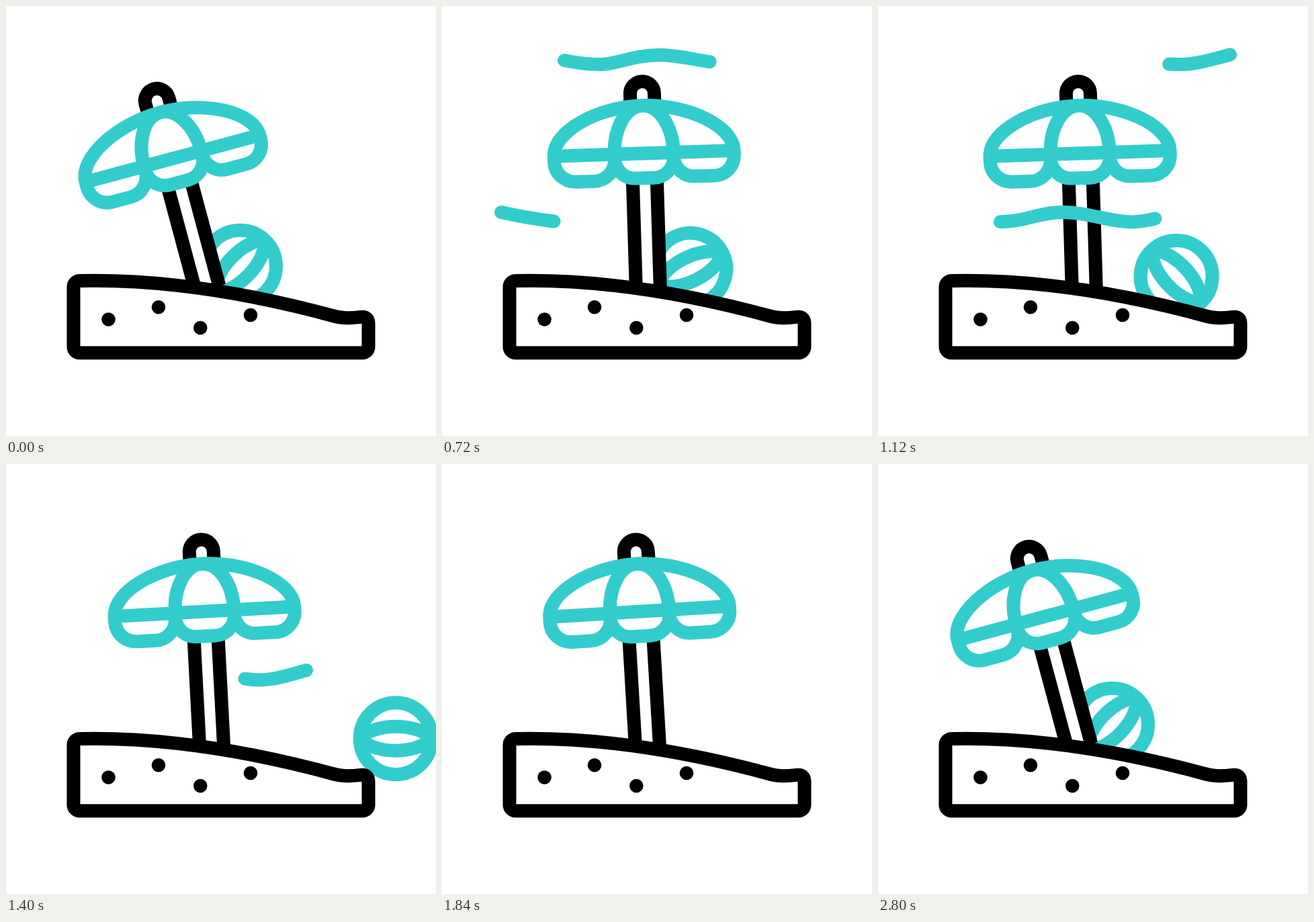
These frames come from a looping animation (640x640 px, 3 s). An HTML page:

```html
<!DOCTYPE html>
<html lang="en">
<head>
<meta charset="utf-8">
<title>Windy beach</title>
<style>
  html, body { margin: 0; height: 100%; overflow: hidden; background: #fff; }
  svg { display: block; width: 100%; height: 100%; }
  .line { fill: none; stroke-width: 20; stroke-linejoin: round; }
  .teal { stroke: #33cccc; }
  .black { stroke: #000; }
  .filled { fill: #fff; }
  .wind { stroke-linecap: round; }
</style>
</head>
<body>
<svg viewBox="0 0 640 640">
  <g id="ball" class="line teal">
    <circle r="53.5" class="filled"/>
    <path d="M-53 0C-32 -24 32 -24 53 0M-53 0C-32 24 32 24 53 0"/>
  </g>

  <!-- Origin is the foot of the pole -->
  <g id="umbrella" class="line">
    <!-- Hides the ball on the left of the pole -->
    <path fill="#fff" d="M-200 -190H18V0H-200Z"/>
    <path class="black filled" d="M-18 -30V-320A18 18 0 0 1 18 -320V-30"/>
    <g class="teal">
      <path class="filled" d="M-134 -231C-134 -267 -68 -302 0 -302S134 -267 134 -231V-224.5A30 30 0 0 1 104 -194.5H74
        A30 30 0 0 1 44 -224A30 30 0 0 1 14 -194H-14A30 30 0 0 1 -44 -223A31 31 0 0 1 -75 -191.5H-103
        A31 31 0 0 1 -134 -222.5Z"/>
      <path d="M-134 -230.5L134 -231M-44 -222V-231A44 71 0 0 1 44 -231V-222"/>
    </g>
  </g>

  <path class="line black filled" d="M100.5 507V418A9 9 0 0 1 109.5 409C240 406 370 429.3 490 462
    C498 464.3 508 465.2 528 462.9Q539.5 462 539.5 472V507A9 9 0 0 1 530.5 516.3H109.5A9 9 0 0 1 100.5 507Z"/>
  <g>
    <circle cx="152.5" cy="466.5" r="10.3"/>
    <circle cx="227" cy="448.3" r="10.3"/>
    <circle cx="289.3" cy="479" r="10.3"/>
    <circle cx="364" cy="460" r="10.3"/>
  </g>

  <path id="highWind" class="line teal wind" pathLength="1"
    d="M168 78C195 84 215 87 237 87S285 73 323 73C365 73 385 86 450 87C472 87 500 79 524 72.5"/>
  <path id="lowWind" class="line teal wind" pathLength="1"
    d="M88 307C120 314 146 318 166 320.5C215 325 235 307 275 307S340 321 378 321.5C402 321 425 313 447 307"/>
</svg>
<script>
const LOOP = 3000;
const [ball, umbrella, highWind, lowWind] =
  ["ball", "umbrella", "highWind", "lowWind"].map(id => document.getElementById(id));

const linear = u => u;
const smooth = u => u * u * (3 - 2 * u);

// Value at time t on a track of [time, value] keys
function track(keys, t, ease) {
  if (t <= keys[0][0]) return keys[0][1];
  for (let i = 1; i < keys.length; i++) {
    const [t0, a] = keys[i - 1], [t1, b] = keys[i];
    if (t < t1) return a + (b - a) * ease((t - t0) / (t1 - t0));
  }
  return keys[keys.length - 1][1];
}

const tilt = [[240, -15], [700, -1.75], [1300, -1.75], [1500, -4.25], [1740, -1.75], [2200, -15]];
const windHead = [[560, 0], [720, .217], [1000, .646], [1120, .9], [1200, 1]];
const windTail = [[980, 0], [1120, .259], [1400, .743], [1650, 1]];

function drawWind(path, t) {
  const head = track(windHead, t, linear), tail = track(windTail, t, linear);
  path.style.display = head > tail ? "" : "none";
  path.setAttribute("stroke-dasharray", `${head - tail} 3`);
  path.setAttribute("stroke-dashoffset", -tail);
}

// Distance rolled from rest: blown off to the right, then back from behind the pole
function rolled(t) {
  if (t < 1900) {
    const s = Math.max(0, t - 240) / 1160;
    return 115 * s ** 2 + 116 * s ** 5;
  }
  return -116 * Math.max(0, (2520 - t) / 620) ** 3;
}

function draw(now) {
  const t = now % LOOP;
  const d = rolled(t);
  const slope = Math.min(207, Math.max(0, d));
  const y = 387.3 + .206 * slope - .000497 * slope ** 2;
  const spin = d * (d > 0 ? .977 : .5);
  ball.setAttribute("transform", `translate(${348.5 + d} ${y}) rotate(${-46.5 + spin})`);
  umbrella.setAttribute("transform", `translate(307.7 450) rotate(${track(tilt, t, smooth)})`);
  drawWind(highWind, t + 280);
  drawWind(lowWind, t);
  requestAnimationFrame(draw);
}
draw(performance.now());
</script>
</body>
</html>
```
